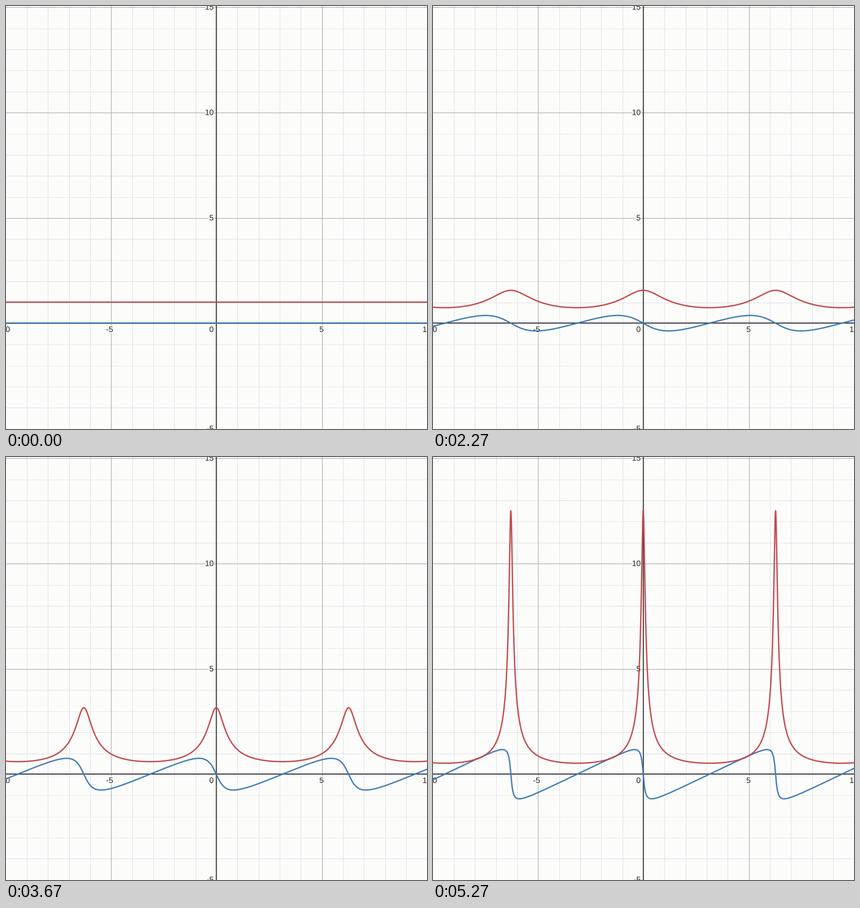
These frames come from a looping animation (746 px wide and 750 px high, 5310 ms). A matplotlib script:

```python
import numpy as np
import matplotlib.pyplot as plt
from matplotlib import patheffects
from matplotlib.animation import FuncAnimation

W, H, DPI = 746, 750, 100
FRAMES, STEP = 177, 30            # 5310 ms per loop
OX, OY = 372.5, 562.4             # origin in pixels
UX, UY = 37.33, 37.37             # pixels per unit

PAPER = "#fcfdfb"
COOL, WARM, MAJOR, INK = "#dfdfea", "#ebecda", "#a6a6a6", "#35332f"
RED, BLUE = "#bf4348", "#3a78b3"


def px(n):
    """Pixels to points."""
    return n * 72 / DPI


def snap(v):
    return np.floor(v) + 0.5


def grid_line(draw, pos, color):
    draw(snap(pos), color=color, lw=px(1), zorder=2 if color == MAJOR else 1)


def label(x, baseline, text, ha):
    halo = patheffects.withStroke(linewidth=px(4), foreground=PAPER)
    ax.text(x, baseline, text, ha=ha, va="baseline", color="#222222",
            family="Liberation Sans", size=px(14), zorder=4,
            path_effects=[halo])


fig = plt.figure(figsize=(W / DPI, H / DPI), dpi=DPI, facecolor=PAPER)
ax = fig.add_axes([0, 0, 1, 1])
ax.set(xlim=(0, W), ylim=(H, 0))
ax.axis("off")

# Grid
warm_rows = {14, 12, 9, 6, 3, -1, -2, -3}
for n in range(-9, 11):
    if n:
        major = n in (-5, 5)
        grid_line(ax.axvline, OX + n * UX, MAJOR if major else "#e1e1e6")
for k in range(-5, 16):
    if k:
        tint = WARM if k in warm_rows else COOL
        grid_line(ax.axhline, OY - k * UY, tint if k % 5 else MAJOR)

# Axes and numbers
ax.axvline(OX + 0.2, color=INK, lw=px(1.8), zorder=3, snap=False)
ax.axhline(OY - 0.2, color="#2d2838", lw=px(1.8), zorder=3, snap=False)
for n in (-10, -5, 5, 10):
    shift = -2.3 if n < 0 else 0
    label(OX + n * UX + shift, OY + 15.6, str(n), "center")
for k in (-5, 5, 10, 15):
    label(368, OY - k * UY + 4.6, str(k), "right")
label(368, OY + 15.6, "0", "right")

# Magnitude and phase of 1 / (1 - r e^(-ix))
xs = np.arange(-2, W + 2, 0.25)
theta = (xs - OX) / UX
style = dict(lw=px(2.4), alpha=0.95, solid_joinstyle="round")
phase, = ax.plot([], [], color=BLUE, zorder=5, **style)
gain, = ax.plot([], [], color=RED, zorder=6, **style)


def update(i):
    t = i * STEP / 1000
    r = np.clip(0.23 * (t - 0.69), 0, 0.92)
    z = 1 / (1 - r * np.exp(-1j * theta))
    gain.set_data(xs, OY - UY * np.abs(z))
    phase.set_data(xs, OY - UY * np.angle(z))
    return phase, gain


anim = FuncAnimation(fig, update, frames=FRAMES, interval=STEP,
                     repeat=True, repeat_delay=0, blit=False)
plt.show()
```
